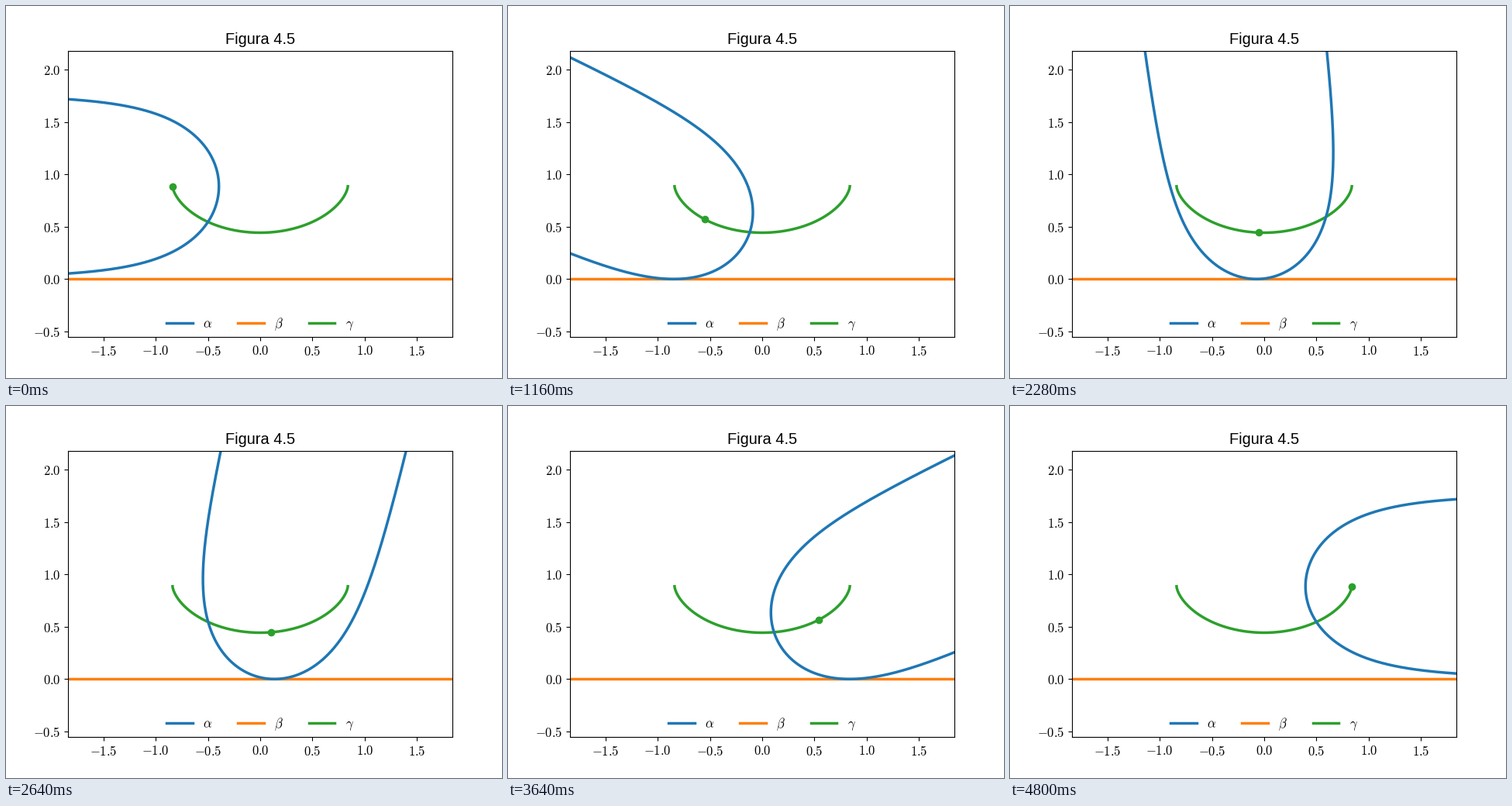
A matplotlib script that plays this animation: 640x480 px, repeating every 4840 ms.

```python
import numpy as np
import matplotlib.pyplot as plt
from matplotlib.animation import FuncAnimation
from matplotlib.ticker import MultipleLocator

plt.rcParams.update({
    "font.size": 12,
    "font.family": "Liberation Sans",
    "mathtext.fontset": "cm",
    "lines.linewidth": 2.5,
})

FRAMES, INTERVAL = 121, 40
SCALE = 0.4432            # distance from the pole to the vertex
THETA_MAX = np.pi - 0.01
THETA_STEP = 0.05207


def height(theta):
    """Distance from the pole to the tangent at theta."""
    return 2 * SCALE / np.sqrt(1 + 3 * np.cos(theta / 2) ** 2)


def turn(theta):
    """Rotation that lays the tangent at theta on the base line."""
    u = theta / 2
    return theta + np.arctan2(2 * np.cos(u), np.sin(u)) - np.pi / 2


# The rolling curve is r = SCALE / cos(theta / 2)
theta = np.linspace(-THETA_MAX, THETA_MAX, 2001)
radius = SCALE / np.cos(theta / 2)

# Path of the pole: dx = y d(turn)
path_y = height(theta)
steps = (path_y[1:] + path_y[:-1]) / 2 * np.diff(turn(theta))
path_x = np.concatenate(([0], np.cumsum(steps)))
path_x -= path_x[-1] / 2

fig, ax = plt.subplots(figsize=(6.4, 4.8), dpi=100)
half_width = 1.838
bottom = -0.555
ax.set_xlim(-half_width, half_width)
ax.set_ylim(bottom, bottom + 2 * half_width * 369.6 / 496)
for axis in (ax.xaxis, ax.yaxis):
    axis.set_major_locator(MultipleLocator(0.5))
    axis.set_major_formatter(lambda v, _: f"${v:.1f}$")
ax.set_title("Figura 4.5")

alpha, = ax.plot([], [], color="C0", zorder=2.2, label=r"$\alpha$")
ax.plot([-half_width, half_width], [0, 0], color="C1", label=r"$\beta$")
ax.plot(path_x, path_y, color="C2", label=r"$\gamma$")
pole, = ax.plot([], [], "o", color="C2", zorder=2.3)
ax.legend(loc="lower center", ncol=3, frameon=False, borderaxespad=0)


def update(k):
    contact = -THETA_MAX + THETA_STEP * k
    x, y = np.interp(contact, theta, path_x), height(contact)
    angle = theta - np.pi / 2 - turn(contact)
    alpha.set_data(x + radius * np.cos(angle), y + radius * np.sin(angle))
    pole.set_data([x], [y])
    return alpha, pole


anim = FuncAnimation(fig, update, frames=FRAMES, interval=INTERVAL,
                     init_func=lambda: update(0), repeat=True, repeat_delay=0)
plt.show()
```
